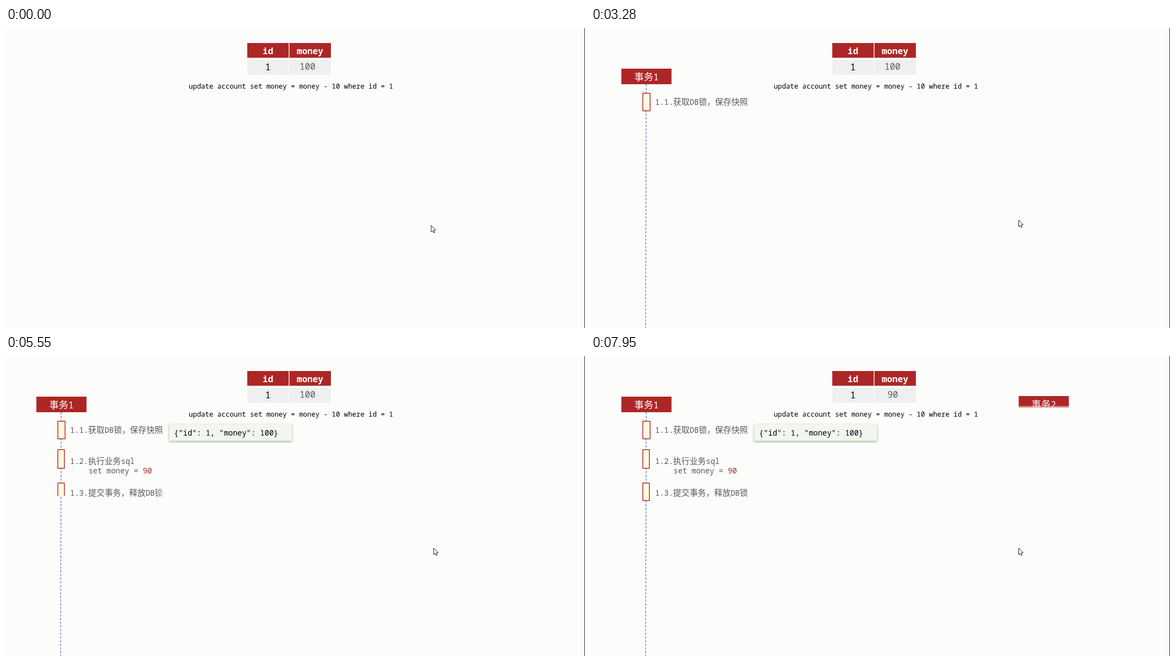
Animation of 1039x539 px, one loop 7.99 s. Source, as an HTML page with a canvas:

```html
<!DOCTYPE html>
<html lang="zh">
<head>
<meta charset="utf-8">
<style>
  html, body { margin: 0; width: 100%; height: 100%; overflow: hidden; background: #fcfcfb; }
  canvas { display: block; }
</style>
</head>
<body>
<canvas id="stage" width="1039" height="539"></canvas>
<script>
const ctx = document.getElementById('stage').getContext('2d');
const LOOP = 7990;
const RED = '#ad2626', GREY = '#595959', BLACK = '#000000', WHITE = '#ffffff';
const MONO = '"Noto Sans Mono", "DejaVu Sans Mono", monospace';
const CJK = '"Noto Sans CJK SC", "Noto Sans CJK", sans-serif';

const progress = (t, start, length) => Math.min(1, Math.max(0, (t - start) / length));

// Colour that is solid up to a soft edge travelling from a to b.
function wipe(color, p, a, b, horizontal) {
  if (p >= 1) return color;
  if (p <= 0) return 'transparent';
  const front = a + (b - a) * 1.2 * p, back = front - (b - a) * 0.2;
  const g = horizontal ? ctx.createLinearGradient(back, 0, front, 0)
                       : ctx.createLinearGradient(0, back, 0, front);
  g.addColorStop(0, color);
  g.addColorStop(1, color + '00');
  return g;
}

function rect(x, y, w, h, fill) {
  ctx.fillStyle = fill;
  ctx.fillRect(x, y, w, h);
}

// Mixed text: monospaced Latin with the given advance, Chinese in its own size.
function text(str, x, y, fill, advance, cjkSize = 14.7, weight = 400) {
  ctx.fillStyle = fill;
  for (const part of str.match(/[\x00-\x7f]+|[^\x00-\x7f]+/g)) {
    const latin = part.charCodeAt(0) < 128;
    ctx.font = latin ? `${weight} ${advance / 0.6}px ${MONO}` : `${cjkSize}px ${CJK}`;
    ctx.fillText(part, x, y);
    x += part.length * (latin ? advance : cjkSize);
  }
}

function faded(alpha, draw) {
  if (alpha <= 0) return;
  ctx.save();
  ctx.globalAlpha = alpha;
  draw();
  ctx.restore();
}

function table(t) {
  rect(433, 27, 74.3, 26.5, RED);
  rect(508.7, 27, 74.3, 26.5, RED);
  rect(433, 57, 74.3, 27, '#efefef');
  rect(508.7, 57, 74.3, 27, '#efefef');
  text('id', 460.5, 47, WHITE, 9.5, 0, 700);
  text('money', 521.8, 47, WHITE, 9.5, 0, 700);
  text('1', 465.2, 76, BLACK, 9.5);
  const p = progress(t, 6475, 815);
  faded((1 - p) ** 1.3, () => text('100', 526.8, 74.5 - 73 * p, GREY, 9.5));
  faded(p, () => text('90', 532, 74.5 + 46 * (1 - p), GREY, 9.5));
  text('update account set money = money - 10 where id = 1', 328, 108.5, BLACK, 7.34);
}

function header(label, x, y, p) {
  rect(x, y, 90, 28, wipe(RED, p, y, y + 28));
  text(label, x + 23, y + 21, wipe(WHITE, p, y, y + 28), 9.5, 17.2);
}

function lifeline(p) {
  ctx.strokeStyle = wipe('#4a74b8', p, 101, 560);
  ctx.lineWidth = 1.2;
  ctx.setLineDash([4, 2.6]);
  ctx.beginPath();
  ctx.moveTo(99, 101);
  ctx.lineTo(98, 560);
  ctx.stroke();
  ctx.setLineDash([]);
}

function step(t, start, y, w, h, lines) {
  const p = progress(t, start, 470);
  if (p <= 0) return;
  ctx.save();
  ctx.beginPath();
  ctx.rect(90, y - 2, 20, (h + 4) * p);
  ctx.clip();
  rect(93, y, w, h, '#fefbdc');
  ctx.strokeStyle = RED;
  ctx.lineWidth = 1.4;
  ctx.strokeRect(93, y + 0.3, w, h - 0.6);
  ctx.restore();
  const q = progress(t, start, 360);
  for (const [str, x, baseline, color] of lines)
    text(str, x, baseline, wipe(color, q, 115, 283, true), 8.14);
}

function snapshot(alpha) {
  faded(alpha, () => {
    ctx.shadowColor = 'rgba(90, 120, 70, .6)';
    ctx.shadowBlur = 4;
    ctx.shadowOffsetY = 1.5;
    rect(293, 122.5, 220, 30, '#f1f7ed');
    ctx.shadowColor = 'transparent';
    text('{"id": 1, "money": 100}', 301.5, 143, BLACK, 8.14);
  });
}

function cursor(p) {
  ctx.save();
  ctx.translate(763 + 4.5 * p, 354.5 - 9.5 * p);
  ctx.beginPath();
  for (const [x, y] of [[0, 0], [0, 12], [2.7, 9.5], [4.6, 13.5], [6.3, 12.7], [4.5, 8.8], [8, 8.4]])
    ctx.lineTo(x, y);
  ctx.closePath();
  ctx.fillStyle = WHITE;
  ctx.fill();
  ctx.strokeStyle = '#22222e';
  ctx.lineWidth = 1;
  ctx.stroke();
  ctx.restore();
}

function draw(t) {
  rect(0, 0, 1039, 539, '#fcfcfb');
  rect(1038, 0, 1, 539, '#303030');
  table(t);
  lifeline(progress(t, 1780, 520));
  header('事务1', 54.5, 73, progress(t, 1290, 350));
  header('事务2', 767.5, 72, progress(t, 7720, 350));
  step(t, 2790, 117, 13, 32, [['1.1.获取DB锁，保存快照', 115, 138, GREY]]);
  snapshot(progress(t, 3320, 480));
  step(t, 4250, 168, 11.7, 34, [
    ['1.2.执行业务sql', 115, 194, GREY],
    ['set money = ', 148, 211, GREY],
    ['90', 245.5, 211, RED],
  ]);
  step(t, 5220, 228, 11.7, 32, [['1.3.提交事务，释放DB锁', 115, 250.5, GREY]]);
  cursor(progress(t, 20, 140));
}

const began = performance.now();
function tick() {
  draw((performance.now() - began) % LOOP);
  requestAnimationFrame(tick);
}
tick();
</script>
</body>
</html>
```
